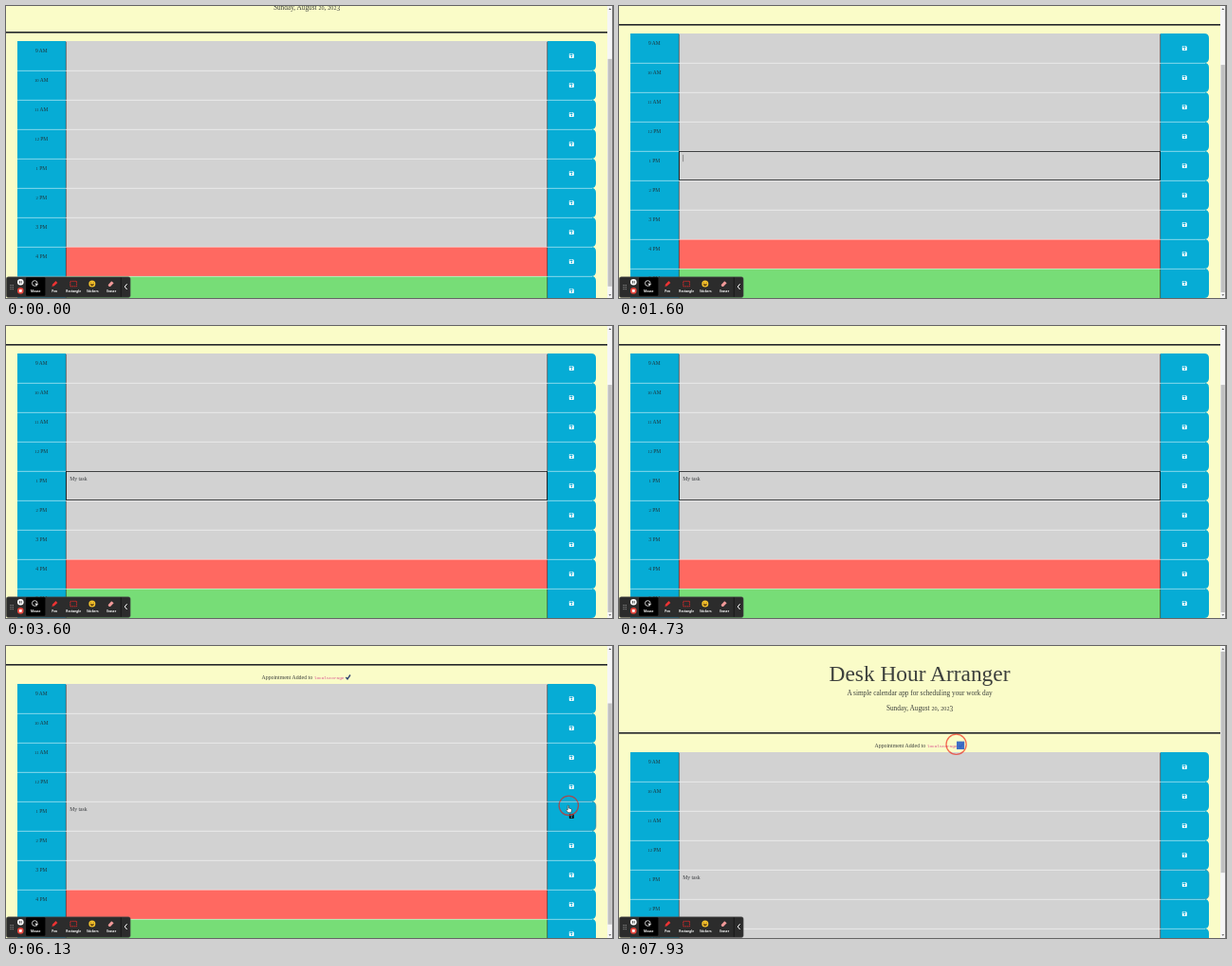
An HTML page for the animation above (8000 ms loop, 640 px wide and 308 px high).

```html
<!DOCTYPE html>
<html lang="en">
<head>
<meta charset="utf-8">
<title>Desk Hour Arranger</title>
<style>
  html, body { margin: 0; height: 100%; overflow: hidden; background: #fafcc8; }
  svg { display: block; width: 100vw; height: 100vh; }
  text { font-family: "Liberation Serif", "Noto Serif", serif; fill: #222529; fill-opacity: .88; white-space: pre; }
  .mid { text-anchor: middle; }
  .code { font-family: "Liberation Mono", "DejaVu Sans Mono", monospace; fill: #d63384; }
  .tool { font: bold 3.2px "Open Sans", "Noto Sans", sans-serif; fill: #fff; fill-opacity: 1; text-anchor: middle; }
</style>
</head>
<body>
<svg viewBox="0 0 640 308">
  <defs>
    <path id="disk" fill-rule="evenodd" d="M-2.5-1.9q0-.6.6-.6h3.2l1.2 1.2v3.2q0 .6-.6.6h-3.8q-.6 0-.6-.6z
      M-1.8-1.8v1.4h2.9v-1.4z M0 .2a.8.8 0 1 0 .01 0z"/>
  </defs>
  <rect width="640" height="308" fill="#fafcc8"/>

  <g id="page">
    <text class="mid" x="317" y="37" font-size="23.4">Desk Hour Arranger</text>
    <text class="mid" x="317" y="52.3" font-size="7.3">A simple calendar app for scheduling your work day</text>
    <text class="mid" id="date" x="317" y="67.6" font-size="7.3"></text>
    <rect y="91" width="634" height="1.6" fill="#222529"/>
    <g id="message">
      <text x="269.5" y="106.7" font-size="5.85">Appointment Added to</text>
      <text class="code" x="324.8" y="106.6" font-size="4.4">localStorage</text>
      <path d="M358.4 105.1l1.6 1.7 3-4.3" fill="none" stroke="#2d4270" stroke-width="1.4"/>
      <rect id="selection" x="356" y="100.6" width="8.2" height="8.4" fill="#3565c5" opacity=".94"/>
    </g>
    <g id="rows"></g>
  </g>

  <g id="scrollbar">
    <rect x="634" width="6" height="308" fill="#f6f6f6"/>
    <rect id="thumb" x="634.6" width="4.2" fill="#c1c1c1"/>
    <rect x="639.4" width=".6" height="308" fill="#333"/>
    <path d="M635.4 3.9l1.4-1.6 1.4 1.6zM635.4 304.2l1.4 1.6 1.4-1.6z" fill="#505050"/>
  </g>

  <g id="hand" transform="translate(593 168)">
    <path d="M-.8.3q.8-.7 1.2.2v2.6l2.3.6q.9.3.7 1.3l-.5 2.7h-3.3l-2.1-2.8q.1-1.1 1.7.1z"
      fill="#fff" stroke="#111" stroke-width=".5"/>
  </g>
  <circle id="ring" fill="none" stroke="#f01c10" stroke-opacity=".65" stroke-width="1.3"/>

  <g id="toolbar">
    <rect x=".3" y="285.8" width="130.8" height="21.6" rx="2" fill="#2c2c2c" stroke="#555" stroke-width=".5"/>
    <path d="M5 294v5.5M7.2 294v5.5" stroke="#aaa" stroke-width="1" stroke-dasharray="1 1.1"/>
    <circle cx="15.3" cy="291.3" r="3.3" fill="#fff"/>
    <path d="M14.4 289.9v2.8M16.2 289.9v2.8" stroke="#222" stroke-width=".8"/>
    <circle cx="15.3" cy="300.4" r="3.3" fill="#e8453c"/>
    <rect x="13.9" y="299" width="2.8" height="2.8" fill="#fff"/>
    <rect x="21" y="286.2" width="20.4" height="19.6" rx="1" fill="#000"/>
    <circle cx="30.3" cy="292.5" r="2.8" fill="none" stroke="#fff" stroke-width=".8"/>
    <path d="M30.4 292l4 1.6-1.7.8-.6 1.9z" fill="#fff" stroke="#000" stroke-width=".3"/>
    <path d="M48.4 296l.7-2.5 3.4-3.4 1.8 1.8-3.4 3.4z" fill="#e33"/>
    <rect x="67.8" y="290.3" width="6.6" height="5.5" fill="none" stroke="#e02a2a" stroke-width=".9" stroke-dasharray="1.6 .6"/>
    <circle cx="90.8" cy="293" r="3.5" fill="#f8c52c"/>
    <path d="M89.5 291.4v1M92.1 291.4v1M88.9 293.7q1.9 2.7 3.8 0z" fill="#5a3a10" stroke="#5a3a10" stroke-width=".6"/>
    <path d="M107.6 294.2l3.6-3.9 2.4 1.9-3.6 3.9h-1.4z" fill="#f29a9a"/>
    <path d="M121.2 286.3v20.6" stroke="#111" stroke-width=".7"/>
    <path d="M127.6 293.2l-2.4 2.9 2.4 2.9" fill="none" stroke="#fff" stroke-width="1"/>
    <text class="tool" x="31.2" y="301.6">Mouse</text>
    <text class="tool" x="51.2" y="301.6">Pen</text>
    <text class="tool" x="71.2" y="301.6">Rectangle</text>
    <text class="tool" x="91.2" y="301.6">Stickers</text>
    <text class="tool" x="111.2" y="301.6">Eraser</text>
  </g>
</svg>
<script>
const DURATION = 8000, VIEW = 308, ROW = 31, TOP = 101, MESSAGE_HEIGHT = 11;
const TASK_ROW = 4, TASK = "My task";
const FOCUS = 1130, TYPE_START = 1980, KEY_GAP = 160;
const SAVE = 5130, CURSOR_END = 6400, SELECT = 7840;
const SCROLL = [[0, 64], [60, 64], [260, 72], [6560, 72], [6740, 39], [6800, 39], [6930, 0]];
const BLUE = "#06acd5", PAST = "#d2d2d2", PRESENT = "#ff6961", FUTURE = "#77dd77";

const $ = id => document.getElementById(id);
const show = (id, on) => $(id).setAttribute("visibility", on ? "inherit" : "hidden");
const set = (id, attrs) => Object.entries(attrs).forEach(([k, v]) => $(id).setAttribute(k, v));

// Old-style figures: 0-2 sit at x-height, the others descend.
const figures = s => s
  .replace(/[0-2]+/g, '<tspan font-size=".84em">$&</tspan>')
  .replace(/([34579])(?![^<]*>)(.?)/g, (m, d, next) =>
    `<tspan dy=".17em">${d}</tspan>` + (next ? `<tspan dy="-.17em">${next}</tspan>` : ""));

function rowMarkup(i) {
  const hour = (i + 8) % 12 + 1, y = TOP + i * ROW;
  const label = figures(String(hour) + (i < 3 ? " AM" : " PM"));
  const fill = i < 7 ? PAST : i === 7 ? PRESENT : FUTURE;
  const task = i === TASK_ROW;
  return `<g transform="translate(0 ${y})">
    <rect x="12" width="51" height="31" fill="${BLUE}"/>
    <rect x="63" width="508" height="31" fill="${fill}"/>
    <path d="M571 0h46q5 0 5 5v21q0 5-5 5h-46z" fill="${BLUE}"
      ${task ? 'id="button" stroke-width="1" stroke-opacity=".5"' : ""}/>
    ${i ? '<path d="M12 .35h606" stroke="#fff" stroke-opacity=".75" stroke-width=".7"/>' : ""}
    <path d="M63.35.7v30.3M570.65.7v30.3" stroke="#222529" stroke-width=".6"/>
    <text class="mid" x="37.3" y="11.5" font-size="5.5">${label}</text>
    <use href="#disk" x="596.3" y="15.4" fill="#fff" ${task ? 'id="taskIcon"' : ""}/>
    ${task ? `<text id="task" x="67.2" y="9.8" font-size="5.65"></text>
      <path id="caret" stroke="#444" stroke-width=".5"/>` : ""}
  </g>`;
}

$("date").innerHTML = figures("Sunday, August 20, 2023");
$("rows").innerHTML = Array.from({ length: 9 }, (_, i) => rowMarkup(i)).join("") +
  `<rect id="outline" x="63.4" y="${TOP + TASK_ROW * ROW + .4}" width="507.2" height="30.2"
    fill="none" stroke="#16181a" stroke-width=".8"/>`;

function scrollAt(t) {
  const i = SCROLL.findIndex(([time]) => time > t);
  if (i < 0) return SCROLL.at(-1)[1];
  const [t0, a] = SCROLL[i - 1], [t1, b] = SCROLL[i];
  const p = (t - t0) / (t1 - t0);
  return a + (b - a) * p * p * (3 - 2 * p);
}

function draw(t) {
  const scroll = scrollAt(t), saved = t >= SAVE;
  const focused = t >= FOCUS && !saved;
  const shift = saved ? MESSAGE_HEIGHT : 0;
  set("page", { transform: `translate(0 ${-scroll})` });
  set("rows", { transform: `translate(0 ${shift})` });
  show("message", saved);

  const ratio = (VIEW - 12) / (TOP + 9 * ROW + shift);
  set("thumb", { y: 6 + scroll * ratio, height: VIEW * ratio });

  const typed = Math.max(0, Math.min(TASK.length, Math.floor((t - TYPE_START) / KEY_GAP) + 1));
  $("task").textContent = TASK.slice(0, typed);
  const lastKey = typed ? TYPE_START + (typed - 1) * KEY_GAP : FOCUS;
  const caretX = 67.6 + (typed ? $("task").getComputedTextLength() : 0);
  set("caret", { d: `M${caretX} 3.8v7.4` });
  show("caret", focused && (t - lastKey) % 1000 < 500);
  show("outline", focused);

  const hovering = saved && t < CURSOR_END, selecting = t >= SELECT;
  set("taskIcon", { fill: hovering ? "#111" : "#fff" });
  set("button", { stroke: saved ? "#46798c" : "none" });
  show("hand", hovering);
  show("selection", saved && selecting);
  show("ring", hovering || selecting);
  set("ring", selecting ? { cx: 355.6, cy: 103.8, r: 10.6 } : { cx: 593.3, cy: 168.3, r: 10.2 });
}

const start = performance.now();
function tick() {
  draw((performance.now() - start) % DURATION);
  requestAnimationFrame(tick);
}
tick();
</script>
</body>
</html>
```
